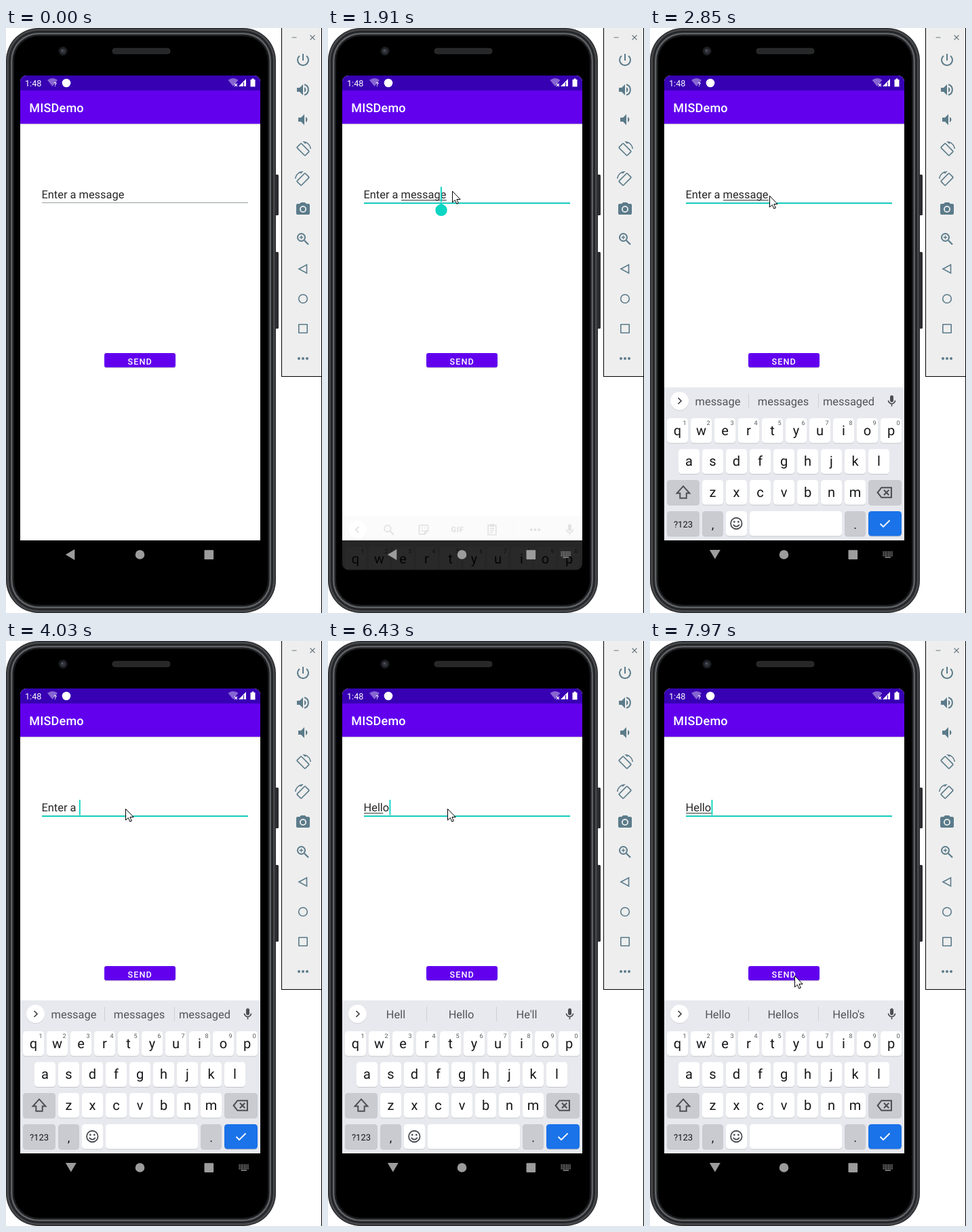
Write an HTML page that moves like this. It is 466x862 px and loops after 8 s.

```html
<!DOCTYPE html>
<html lang="en">
<head>
<meta charset="utf-8">
<title>Phone emulator</title>
<style>
  html, body { margin: 0; width: 100%; height: 100%; overflow: hidden; background: #fff; }
  svg { display: block; width: 100%; height: 100%; }
  text { font-family: Roboto, "Open Sans", sans-serif; white-space: pre; text-rendering: geometricPrecision; }
</style>
</head>
<body>
<svg id="stage" viewBox="0 0 466 862" xmlns="http://www.w3.org/2000/svg"></svg>
<script>
const LOOP = 8000, FIELD_X = 52.5, FIELD_SIZE = 16.4, TEAL = '#0bd5c3';

// ---- markup helpers ----
const rect = (x, y, w, h, fill, r = 0, extra = '') =>
  `<rect x="${x}" y="${y}" width="${w}" height="${h}" rx="${r}" fill="${fill}" ${extra}/>`;
const circle = (x, y, r, fill, extra = '') => `<circle cx="${x}" cy="${y}" r="${r}" fill="${fill}" ${extra}/>`;
const text = (x, y, size, fill, str, extra = '') =>
  `<text x="${x}" y="${y}" font-size="${size}" fill="${fill}" ${extra}>${str}</text>`;
const mid = 'text-anchor="middle"';
const line = (d, color, w = 1.5, extra = '') =>
  `<path d="${d}" fill="none" stroke="${color}" stroke-width="${w}" ${extra}/>`;
const shape = (d, fill, extra = '') => `<path d="${d}" fill="${fill}" ${extra}/>`;
// 24-unit icon centred on x, y
const icon = (x, y, size, body) =>
  `<g transform="translate(${x} ${y}) scale(${size / 24}) translate(-12 -12)">${body}</g>`;
const dots = (x, y, gap, r, fill) => [-1, 0, 1].map(i => circle(x + i * gap, y, r, fill)).join('');

const lens = c => circle(9.5, 9.5, 5.5, 'none', `stroke="${c}" stroke-width="2"`) + line('M14 14L20 20', c, 2.2);

// ---- phone ----
function phone() {
  const ring = (inset, fill) => rect(inset, inset, 398 - 2 * inset, 862 - 2 * inset, fill, 48 - inset);
  return rect(396, 216, 6, 60, '#2c2d30', 1.5) + rect(396, 330, 6, 113, '#2c2d30', 1.5) +
    ring(0, '#2a2b2d') + ring(1.5, '#47494c') + ring(4, '#242527') + ring(7, '#5f6164') +
    ring(9.5, '#1b1c1e') + ring(12, '#000') +
    circle(84, 34, 6.5, '#1d1e22') + circle(84, 34, 3.6, '#34363f') + circle(83, 33, 1.2, '#565a68') +
    rect(157, 30, 85, 8, '#262728', 4, 'stroke="#363738" stroke-width=".8"');
}

function fan(x, y) {
  return shape(`M${x} ${y + 6}L${x - 7.5} ${y - 3.2}Q${x} ${y - 9} ${x + 7.5} ${y - 3.2}Z`, '#fff', 'opacity=".4"');
}

function appScreen() {
  const bars = rect(21, 70, 354, 685, '#fff') + rect(21, 70, 354, 22, '#3700b3') +
    rect(21, 92, 354, 49, '#6200ee') + rect(21, 141, 354, 1, '#cfc8dc') + rect(21, 142, 354, 1, '#f1f1f3');
  const status = text(28, 85.5, 12.6, '#fff', '1:48') +
    fan(68.5, 80) + text(70.5, 86, 8.5, '#fff', '?', 'font-weight="700"') + circle(89, 81, 6.3, '#fff') +
    fan(335, 80) + line('M337 82l4 4m0 -4l-4 4', '#fff', 1.1) +
    shape('M354 75V86H343Z', '#fff') + line('M350.5 80V86', '#3700b3', 1) +
    shape('M362.5 74.5H365.5V76H367.5V86.5H360.5V76H362.5Z', '#fff');
  const send = rect(145, 480, 105, 21.2, '#b9b6c2', 3, 'opacity=".7"') +
    rect(145, 479, 105, 21, '#6200ee', 3) +
    text(179.5, 496, 12.6, '#fff', 'SEND', 'font-weight="500" letter-spacing="1.13"');
  return bars + status + text(34.3, 124, 18, '#fff', 'MISDemo', 'font-weight="500" letter-spacing=".2"') + send;
}

function field() {
  return rect(53, 257, 304, 1, '#9a9f9e') + rect(53, 257.3, 304, 1.9, TEAL, 0, 'id="focus"') +
    text(FIELD_X, 251, FIELD_SIZE, '#9b9b9b', 'Enter a message', 'id="hint"') +
    text(FIELD_X, 251, FIELD_SIZE, '#262626', '', 'id="value"') +
    rect(0, 253.3, 0, 1, '#262626', 0, 'id="compose"') +
    rect(0, 234, 1.9, 22.5, TEAL, 0, 'id="caret"') +
    shape('M167 258.5L173 262A8.7 8.7 0 1 1 161 262Z', TEAL, 'id="handle"');
}

// ---- soft keyboard ----
function key(x, y, w, fill, label = '', size = 20, base = 24.5) {
  return rect(x, y + 1, w, 36.5, '#c4c5ca', 4.5) + rect(x, y, w, 36.5, fill, 4.5) +
    (label && text(x + w / 2, y + base, size, '#151618', label, mid));
}

function keyboard() {
  const grey = '#cacbd1', ink = '#4b4f54';
  const row = (letters, cx, y) => [...letters].map((c, i) => key(cx + i * 35 - 15.5, y, 31, '#fff', c)).join('');
  const digits = [...'1234567890'].map((c, i) => text(51 + i * 35, 584.5, 9, '#55585c', c, mid)).join('');
  const shift = line('M12 3L21 13H16.5V20H7.5V13H3Z', ink, 1.9);
  const erase = line('M8 5H22V19H8L2.5 12Z', ink, 2) + line('M11.5 8.5l7 7m0 -7l-7 7', ink, 2);
  const smile = circle(12, 12, 9, 'none', `stroke="${ink}" stroke-width="2"`) + circle(8.7, 9.5, 1.5, ink) +
    circle(15.3, 9.5, 1.5, ink) + line('M7 14Q12 20 17 14', ink, 2);
  const sticker = line('M20 14V6Q20 4 18 4H6Q4 4 4 6V18Q4 20 6 20H14L20 14H16Q14 14 14 16V20', ink, 2) +
    circle(9, 9, 1.3, ink) + circle(15, 9, 1.3, ink) + line('M7.5 12.5Q10 16 13 13.5', ink, 1.7);
  const clip = line('M5 4H19V21H5Z', ink, 2) + rect(8, 2, 8, 5, ink, 1) + line('M8 10H16M8 13.5H16M8 17H13', ink, 1.8);
  const mic = rect(9, 2, 6, 12, ink, 3) + line('M6 11a6 6 0 0 0 12 0M12 17V21.5', ink, 2);
  const tools = icon(90, 550, 21, lens(ink)) + icon(141, 549.5, 20, sticker) +
    text(191, 553.5, 11.5, ink, 'GIF', mid + ' font-weight="900" letter-spacing=".6"') +
    icon(242, 549.5, 20, clip) + rect(273.5, 540, 1, 20, '#cfd0d5') + dots(305.5, 549.5, 5.7, 1.9, ink);
  const words = [100, 196.5, 293].map(x => text(x, 556, FIELD_SIZE, '#50545a', '', mid + ' class="word"')).join('') +
    rect(145, 539, 1, 21, '#cfd0d5') + rect(248, 539, 1, 21, '#cfd0d5');

  return rect(21, 529.5, 354, 225.5, '#e8e9ee') + circle(43.5, 550.3, 13.7, '#d2d3d8') + circle(43.5, 549.5, 13.5, '#fff') +
    line('M45.5 545L41 549.5L45.5 554', '#3d4044', 1.7, 'id="chevron"') +
    `<g id="tools">${tools}</g><g id="words">${words}</g>` + icon(356.5, 549.5, 20, mic) +
    row('qwertyuiop', 40.5, 575) + digits + row('asdfghjkl', 57.5, 620.5) + row('zxcvbnm', 92.5, 666) +
    key(25, 666, 48, grey) + icon(49, 684.5, 25, shift) + key(322, 666, 49, grey) + icon(345.5, 684.5, 25, erase) +
    key(25, 712, 48, grey, '?123', 13, 23.5) + key(77, 712, 31, grey, ',', 18, 26) +
    key(112, 712, 31, '#fff') + icon(127.3, 730, 22, smile) + key(147, 712, 136, '#fff') +
    key(287, 712, 31, grey, '.', 18, 26) + key(322, 712, 49, '#1a73e8') +
    line('M339.5 730.5L344 735L353.5 725.5', '#fff', 1.8);
}

function navBar() {
  const c = '#9c9c9c';
  let board = '';
  for (let r = 0; r < 3; r++) for (let i = 0; i < 6; i++)
    board += rect(343.5 + i * 2.5, 771.5 + r * 2.6, 1.6, 1.6, c);
  return shape('M-7.5 0L6 -8V8Z', c, 'id="back"') + circle(197.5, 776, 6.8, c) + rect(292.5, 769.3, 13.6, 13.6, c, 1) +
    `<g id="switcher">${board}${rect(346.5, 779.3, 8.5, 1.4, c)}</g>`;
}

// ---- emulator side panel ----
function sidePanel() {
  const c = '#5b7b8a', x = 438;
  const power = line('M12 3V13M6.9 5.9A8 8 0 1 0 17.1 5.9', c, 2);
  const wave = 'M0 7.9Q2.5 9.2 2.5 12T0 16.1Z';
  const speaker = 'M3 9V15H7L12 20V4L7 9Z';
  const loud = shape(speaker, c) + shape(wave, c, 'transform="translate(14)"') +
    line('M14 4.3A8 8 0 0 1 14 19.7', c, 2);
  const soft = `<g transform="translate(2)">${shape(speaker, c)}${shape(wave, c, 'transform="translate(14)"')}</g>`;
  const turn = rect(7.5, 3.5, 9, 17, 'none', 1, `stroke="${c}" stroke-width="1.7" transform="rotate(-45 12 12)"`) +
    shape('M16.5 2.5Q21.9 5.2 22.5 11H24C23.4 4.8 18.3 0 12 0H11.3L15.2 3.8Z', c);
  const camera = shape('M9 2L7.2 4H4Q2 4 2 6V18Q2 20 4 20H20Q22 20 22 18V6Q22 4 20 4H16.8L15 2Z', c) +
    circle(12, 12, 4.1, 'none', 'stroke="#eee" stroke-width="1.8"');
  return rect(406, 0, 60, 514, '#000') + rect(407, 0, 58, 513, '#eeeeee') + rect(465, 0, 1, 862, '#000') +
    line('M421.5 14H428.5M448.5 10.5l7 7m0 -7l-7 7', '#6c7a82', 1.2) +
    icon(x, 47, 24, power) + icon(x, 91, 24, loud) + icon(x, 135, 24, soft) + icon(x, 179, 24, turn) +
    icon(x, 223, 24, `<g transform="translate(24) scale(-1 1)">${turn}</g>`) + icon(x, 267, 24, camera) +
    icon(x, 311, 24, lens(c) + line('M9.5 6.8V12.2M6.8 9.5H12.2', c, 1.3)) +
    line('M432 355L443.5 348.8V361.2Z', c, 1.6) + circle(x, 399, 6.3, 'none', `stroke="${c}" stroke-width="1.6"`) +
    rect(431.8, 436.8, 12.4, 12.4, 'none', .5, `stroke="${c}" stroke-width="1.6"`) + dots(x, 487, 6, 2, c);
}

const stage = document.getElementById('stage');
stage.innerHTML = `<defs><clipPath id="glass">${rect(21, 70, 354, 728.5, '#000', 9)}</clipPath></defs>` +
  rect(0, 0, 466, 862, '#fff') + phone() +
  `<g clip-path="url(#glass)">${appScreen()}${field()}<g id="keyboard">${keyboard()}</g>${navBar()}</g>` + sidePanel() +
  shape('M0 0V16.5L3.8 13L6.3 18.7L8.8 17.6L6.4 12H11.6Z', '#fff', 'id="mouse" stroke="#000" stroke-width="1"');

// ---- timeline ----
const $ = id => document.getElementById(id);
const wordNodes = document.querySelectorAll('.word');
const ctx = document.createElement('canvas').getContext('2d');
ctx.font = `${FIELD_SIZE}px Roboto, "Open Sans", sans-serif`;
const widthOf = s => ctx.measureText(s).width;
const ramp = (t, a, b) => {
  const p = Math.min(1, Math.max(0, (t - a) / (b - a)));
  return p * p * (3 - 2 * p);
};
const latest = (list, t) => list.filter(e => e[0] <= t).pop()[1];

const START = 'Enter a message';
const ERASE = [3580, 3645, 3710, 3775, 3840, 3905, 3970, 4150, 4190, 4250, 4310, 4390, 4440, 4500, 4560];
const TYPE = [[5490, 'H'], [6100, 'He'], [6230, 'Hel'], [6350, 'Hell'], [6430, 'Hello']];
const WORDS = [
  [0, 'message messages messaged'], [4250, 'Enter Entered Enters'], [5740, 'H He Hi'],
  [6150, 'He Hey He\'s'], [6290, 'Hel Hello Help'], [6390, 'Hell Hello He\'ll'], [6600, 'Hello Hellos Hello\'s']
];
const HIDDEN = [[0, 1260], [2600, 3050], [5170, 5490], [7120, 7600]];
const PATH = [
  [80, 456, 440], [690, 168, 246], [890, 168, 246], [1100, 178, 230], [1260, 178, 230], [1380, 183, 240],
  [1910, 183, 240], [2030, 180, 245], [2360, 176, 247], [7120, 176, 247], [7500, 235, 502],
  [7810, 229, 488], [7969, 229, 488], [7970, 213, 493]
];

function valueAt(t) {
  if (t >= TYPE[0][0]) return latest(TYPE, t);
  return START.slice(0, START.length - ERASE.filter(e => e <= t).length);
}

function mouseAt(t) {
  let i = 0;
  while (i < PATH.length - 2 && t >= PATH[i + 1][0]) i++;
  const [a, b] = [PATH[i], PATH[i + 1]], p = ramp(t, a[0], b[0]);
  return [a[1] + (b[1] - a[1]) * p, a[2] + (b[2] - a[2]) * p];
}

const set = (id, attrs) => { for (const k in attrs) $(id).setAttribute(k, attrs[k]); };
const show = (id, on) => set(id, { opacity: +on });

function draw(t) {
  const value = valueAt(t);
  $('value').textContent = value;
  show('hint', !value);
  show('focus', ramp(t, 890, 1100));

  // the composing underline trails the newest letter
  const from = value.lastIndexOf(' ') + 1, to = Math.min(value.length, valueAt(t - 40).length);
  const left = widthOf(value.slice(0, from));
  set('compose', {
    x: FIELD_X + left + .5,
    width: t < 1550 ? 0 : Math.max(0, widthOf(value.slice(0, to)) - left)
  });

  const before = t < 2000 ? value.slice(0, -1) : value;
  set('caret', { x: FIELD_X + widthOf(before) + .3 });
  show('caret', !HIDDEN.some(([a, b]) => t >= a && t < b));
  show('handle', t >= 1300 && t < 2000);

  const slide = t < 2300 ? 196 * Math.exp(-(t - 1910) * 0.0325) : 0;
  set('keyboard', {
    transform: `translate(0 ${t < 1910 ? 0 : slide})`,
    opacity: t < 1910 ? 0 : .16 + .84 * ramp(t, 1910, 2000)
  });

  const strip = ramp(t, 2600, 2800) - ramp(t, 4560, 4720) + ramp(t, 5740, 5860);
  show('tools', 1 - strip);
  show('words', strip);
  set('chevron', { transform: `rotate(${180 * strip} 43.5 549.5)` });
  latest(WORDS, t).split(' ').forEach((w, i) => { wordNodes[i].textContent = w; });

  const turn = ramp(t, 2600, 2800);
  set('back', { transform: `translate(${95.3 + .5 * turn} ${776 - turn}) rotate(${-90 * turn})` });
  show('switcher', t >= 1570);

  const [x, y] = mouseAt(t);
  set('mouse', { transform: `translate(${x + .5} ${y + .5})` });
  show('mouse', t >= 80);
}

const begin = performance.now();
function tick() {
  draw((performance.now() - begin) % LOOP);
  requestAnimationFrame(tick);
}
tick();
</script>
</body>
</html>
```
